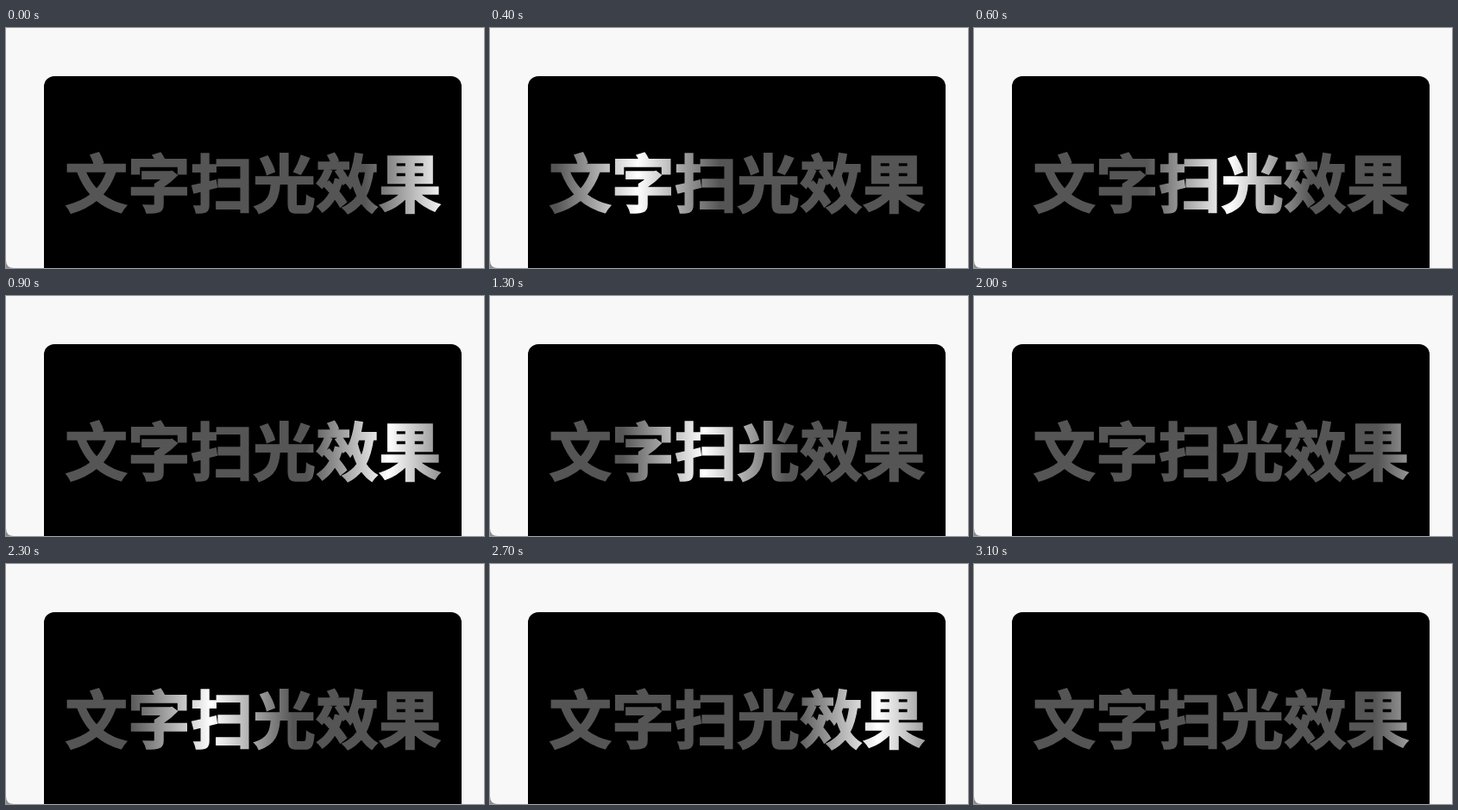
An HTML page for the animation above (3.2 s loop, 554 by 279 pixels).

```html
<!DOCTYPE html>
<html lang="zh-CN">
<head>
<meta charset="utf-8">
<title>文字扫光效果</title>
<style>
  html, body { margin: 0; width: 100%; height: 100%; overflow: hidden; background: #8c8c8c; }
  svg { display: block; }
  text {
    font: bold 72.7px "Noto Sans CJK SC", "Noto Sans CJK", sans-serif;
    fill: url(#shine);
    stroke: url(#shine);
    stroke-width: 1.7px;
  }
</style>
</head>
<body>
<svg width="554" height="279" viewBox="0 0 554 279">
  <defs>
    <linearGradient id="shine" gradientUnits="userSpaceOnUse" y1="0" y2="0">
      <stop offset="0" stop-color="#555"/>
      <stop offset="0.5" stop-color="#fff"/>
      <stop offset="1" stop-color="#555"/>
    </linearGradient>
  </defs>
  <path d="M0 0H554V279H9Q0 279 0 270Z" fill="#f8f8f8"/>
  <rect x="44" y="56" width="484" height="240" rx="12"/>
  <text x="68.3" y="207.6">文字扫光效果</text>
</svg>
<script>
  const LOOP = 3200, STEP = 100;
  const SWEEPS = [
    { start: -640, duration: 920 },
    { start: 395, duration: 1000 },
    { start: 1200, duration: 800 },
    { start: 2195, duration: 970 },
  ];
  const FROM = 168, TRAVEL = 395, HALF_WIDTH = 95;
  const shine = document.getElementById('shine');

  const easeOut = p => 1 - (1 - p) ** 1.7;

  function draw(time) {
    const t = Math.floor(time % LOOP / STEP) * STEP;
    const { start, duration } = SWEEPS.filter(sweep => sweep.start <= t).pop();
    const progress = Math.min(1, (t - start) / duration);
    const center = FROM + TRAVEL * easeOut(progress);
    shine.setAttribute('x1', center - HALF_WIDTH);
    shine.setAttribute('x2', center + HALF_WIDTH);
  }

  function tick() {
    draw(performance.now());
    requestAnimationFrame(tick);
  }
  tick();
</script>
</body>
</html>
```
